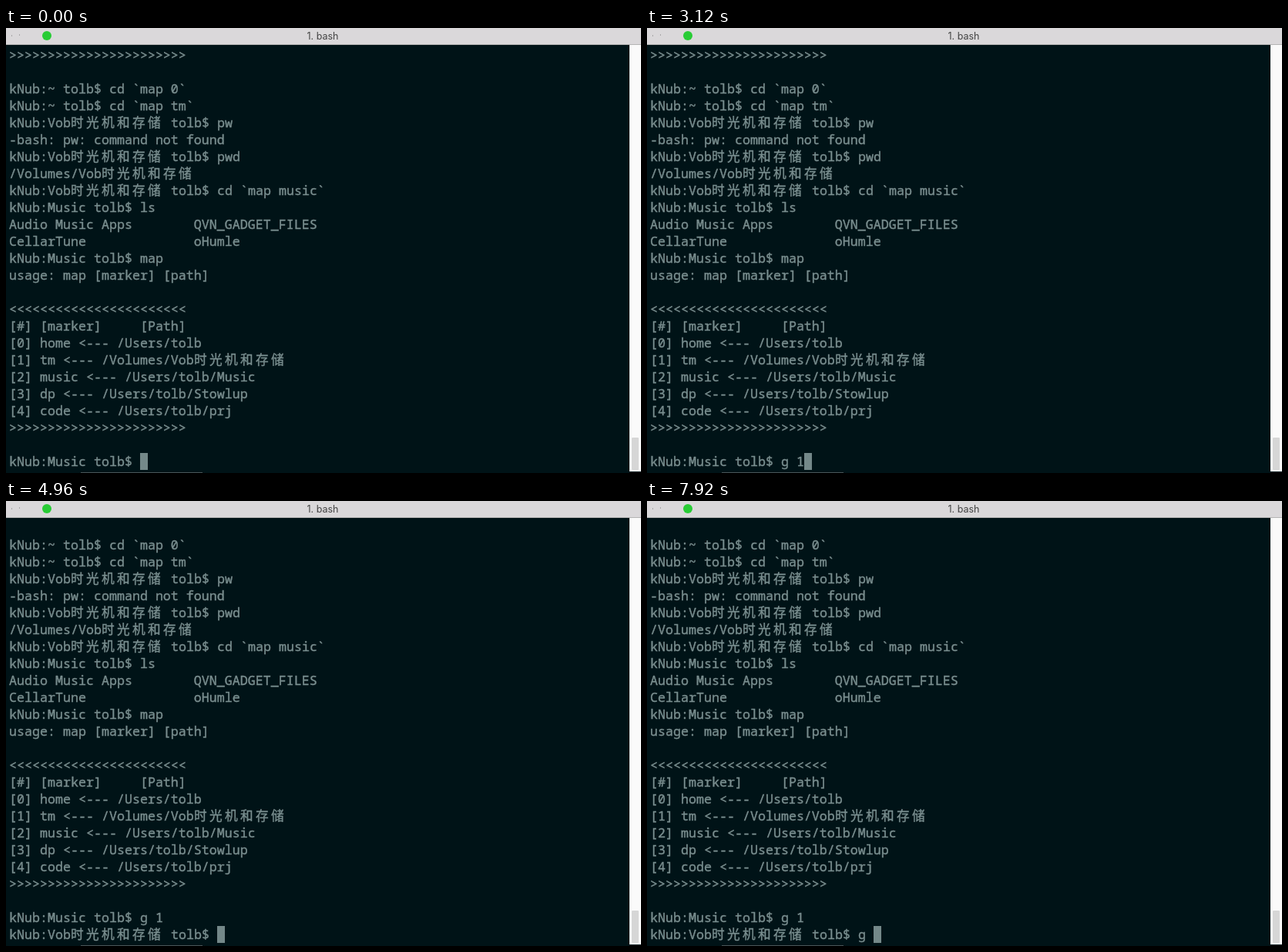
An HTML page that plays this animation: 824x578 px, repeating every 8000 ms.

```html
<!DOCTYPE html>
<html lang="en">
<head>
<meta charset="utf-8">
<title>Terminal</title>
<style>
  html, body { margin: 0; width: 100%; height: 100%; overflow: hidden; background: #001317; }
  svg { display: block; width: 100vw; height: 100vh; }
  #screen text { white-space: pre; font: 16.667px "Noto Sans Mono", "Noto Sans CJK SC", "DejaVu Sans Mono", monospace; fill: #7a8e8f; stroke: #7a8e8f; stroke-width: .4px; }
  .title { font: 12.5px Inter, "Open Sans", sans-serif; fill: #444; }
</style>
</head>
<body>
<svg viewBox="0 0 824 578" preserveAspectRatio="none">
  <rect width="824" height="578" fill="#001317"/>
  <g id="screen"></g>
  <rect id="cursor" y="552" width="10" height="22" fill="#748889"/>
  <rect width="824" height="21" fill="#dad8da"/>
  <rect y="21" width="824" height="1" fill="#b4b4b4"/>
  <path d="M7 10h1M17 9h1" stroke="#777" stroke-width="1"/>
  <circle cx="53" cy="10" r="6" fill="#28cc35"/>
  <text class="title" x="411" y="15" text-anchor="middle">1. bash</text>
  <rect x="809" y="22" width="15" height="554" fill="#fafafa"/>
  <rect x="812" y="532" width="9" height="42" rx="1" fill="#d6d6d6"/>
  <rect x="97" y="577" width="158" height="1" fill="#4a5658"/>
</svg>
<script>
const NS = "http://www.w3.org/2000/svg";
const LOOP = 8000, CELL = 10, LEFT = 4, ROW = 22, BASE = 41, ROWS = 25;
const host = "kNub", user = "tolb", disk = "Vob时光机和存储";
const prompt = dir => `${host}:${dir} ${user}$ `;
const close = ">".repeat(23), open = "<".repeat(23);

const history = [
  close,
  "",
  prompt("~") + "cd `map 0`",
  prompt("~") + "cd `map tm`",
  prompt(disk) + "pw",
  "-bash: pw: command not found",
  prompt(disk) + "pwd",
  "/Volumes/" + disk,
  prompt(disk) + "cd `map music`",
  prompt("Music") + "ls",
  "Audio Music Apps".padEnd(24) + "QVN_GADGET_FILES",
  "CellarTune".padEnd(24) + "oHumle",
  prompt("Music") + "map",
  "usage: map [marker] [path]",
  "",
  open,
  "[#] [marker]     [Path]",
  `[0] home <--- /Users/${user}`,
  `[1] tm <--- /Volumes/${disk}`,
  `[2] music <--- /Users/${user}/Music`,
  `[3] dp <--- /Users/${user}/Stowlup`,
  `[4] code <--- /Users/${user}/prj`,
  close,
  ""
];

const ENTER = 3600;
const first = [[240, "g"], [2160, " "], [2880, "1"]];
const second = [[5760, "g"], [6720, " "]];
const typed = (keys, t) => keys.filter(k => t >= k[0]).map(k => k[1]).join("");

const isWide = ch => ch > "\u2fff";
const cells = s => [...s].reduce((n, ch) => n + (isWide(ch) ? 2 : 1), 0);

const rows = Array.from({ length: ROWS }, (_, i) => {
  const el = document.createElementNS(NS, "text");
  el.setAttribute("y", BASE + i * ROW);
  document.getElementById("screen").append(el);
  return { el, value: null };
});
const cursor = document.getElementById("cursor");

// Wide characters take two cells and sit at the left of their pair.
function setRow(row, value) {
  if (row.value === value) return;
  row.value = value;
  row.el.replaceChildren();
  let col = 0;
  for (const run of value.match(/[\u3000-\uffff]|[^\u3000-\uffff]+/g) || []) {
    const span = document.createElementNS(NS, "tspan");
    span.setAttribute("x", LEFT + col * CELL);
    span.textContent = run;
    row.el.append(span);
    col += cells(run);
  }
}

function draw(t) {
  const lines = [...history, prompt("Music") + typed(first, t)];
  if (t >= ENTER) lines.push(prompt(disk) + typed(second, t));
  const view = lines.slice(-ROWS);
  rows.forEach((row, i) => setRow(row, view[i]));
  cursor.setAttribute("x", LEFT + cells(view[ROWS - 1]) * CELL);
}

const start = performance.now();
function tick() {
  draw((performance.now() - start) % LOOP);
  requestAnimationFrame(tick);
}
draw(0);
requestAnimationFrame(tick);
</script>
</body>
</html>
```
